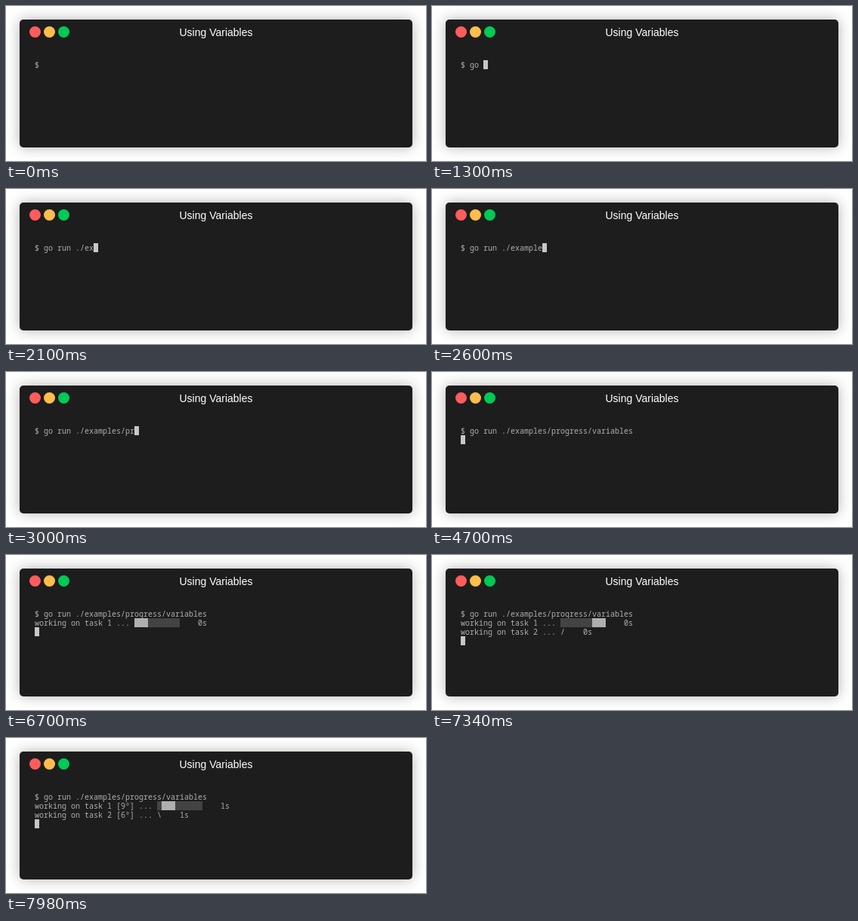
Recreate the animation shown at these times as an HTML page. Size 556 by 206 pixels, loop 8 s.

```html
<!DOCTYPE html>
<html lang="en">
<head>
<meta charset="utf-8">
<title>Using Variables</title>
<style>
  html, body { margin: 0; width: 100%; height: 100%; overflow: hidden; background: #fff; }
  .window {
    position: absolute; left: 18px; top: 18px; width: 520px; height: 170px;
    border-radius: 5px; background: #1d1d1d; box-shadow: 0 0 18px rgba(0, 0, 0, .3);
  }
  .dot { position: absolute; top: 9px; width: 15px; height: 15px; border-radius: 50%; }
  .title {
    position: absolute; top: 9px; width: 100%; text-align: center; color: #fff;
    font: 14px/16px "Liberation Sans", Arial, sans-serif;
  }
  #screen {
    position: absolute; left: 20px; top: 54px; margin: 0; color: #afafaf;
    font: 10px/12px "Noto Sans Mono", monospace;
  }
  #cursor { position: absolute; width: 6px; height: 12px; background: #c7c7c7; }
  .row { height: 12px; white-space: pre; }
  .bar {
    display: inline-block; position: relative; width: 60px; height: 12px; vertical-align: top;
    background: repeating-linear-gradient(#3c3c3c 0 1px, #4a4a4a 1px 2px);
  }
  .bar i { position: absolute; top: 0; width: 18px; height: 12px; background: #afafaf; }
</style>
</head>
<body>
<div class="window">
  <div class="dot" style="left:13px;background:#ff5c5c"></div>
  <div class="dot" style="left:32px;background:#ffbd4c"></div>
  <div class="dot" style="left:51px;background:#00ca56"></div>
  <div class="title">Using Variables</div>
  <div id="screen"></div>
</div>
<script>
const LOOP = 8000, CELL = 6, ROW = 12;
const ENTER = 4700, START = 6700, TICK = 107;
const COMMAND = "go run ./examples/progress/variables";
const IDLE_TICKS = [11, 17, 20, 23, 33, 40];
const REDRAWS = [6700, 6800, 7020, 7120, 7240, 7340, 7560, 7660, 7760, 7880, 7980];
const screenEl = document.getElementById("screen");

function typedCount(t) {
  let tick = Math.floor(t / 100);
  if (IDLE_TICKS.includes(tick)) tick--;
  return Math.max(0, Math.min(COMMAND.length, tick - 10));
}

function bar(step) {
  const phase = step % 14;
  const offset = Math.min(phase, 14 - phase);
  return `<span class="bar"><i style="left:${offset * CELL}px"></i></span>`;
}

function task(number, seconds, degrees, indicator) {
  const label = seconds ? ` [${degrees}°]` : "";
  return `working on task ${number}${label} ... ${indicator}    ${seconds}s`;
}

function progressRows(t) {
  const now = REDRAWS.filter(time => time <= t).pop();
  if (now === undefined) return [];
  const step = Math.round((now - START) / TICK);
  const seconds = since => Math.floor((now - since) / 1000);
  const rows = [task(1, seconds(START), 9, bar(step ? step + 1 : 0))];
  if (step) rows.push(task(2, seconds(START + 100), 6, "|/-\\"[(step - 1) % 4]));
  return rows;
}

function render(t) {
  const typed = typedCount(t);
  const rows = ["$ " + COMMAND.slice(0, typed), ...progressRows(t)];
  const entered = t >= ENTER;
  const x = entered ? 0 : (2 + typed) * CELL;
  const y = entered ? rows.length * ROW : 0;
  const cursor = t < 100 ? "" : `<div id="cursor" style="left:${x}px;top:${y}px"></div>`;
  return rows.map(row => `<div class="row">${row}</div>`).join("") + cursor;
}

let shown = "";
function draw() {
  const html = render(performance.now() % LOOP);
  if (html !== shown) screenEl.innerHTML = shown = html;
  requestAnimationFrame(draw);
}
draw();
</script>
</body>
</html>
```
